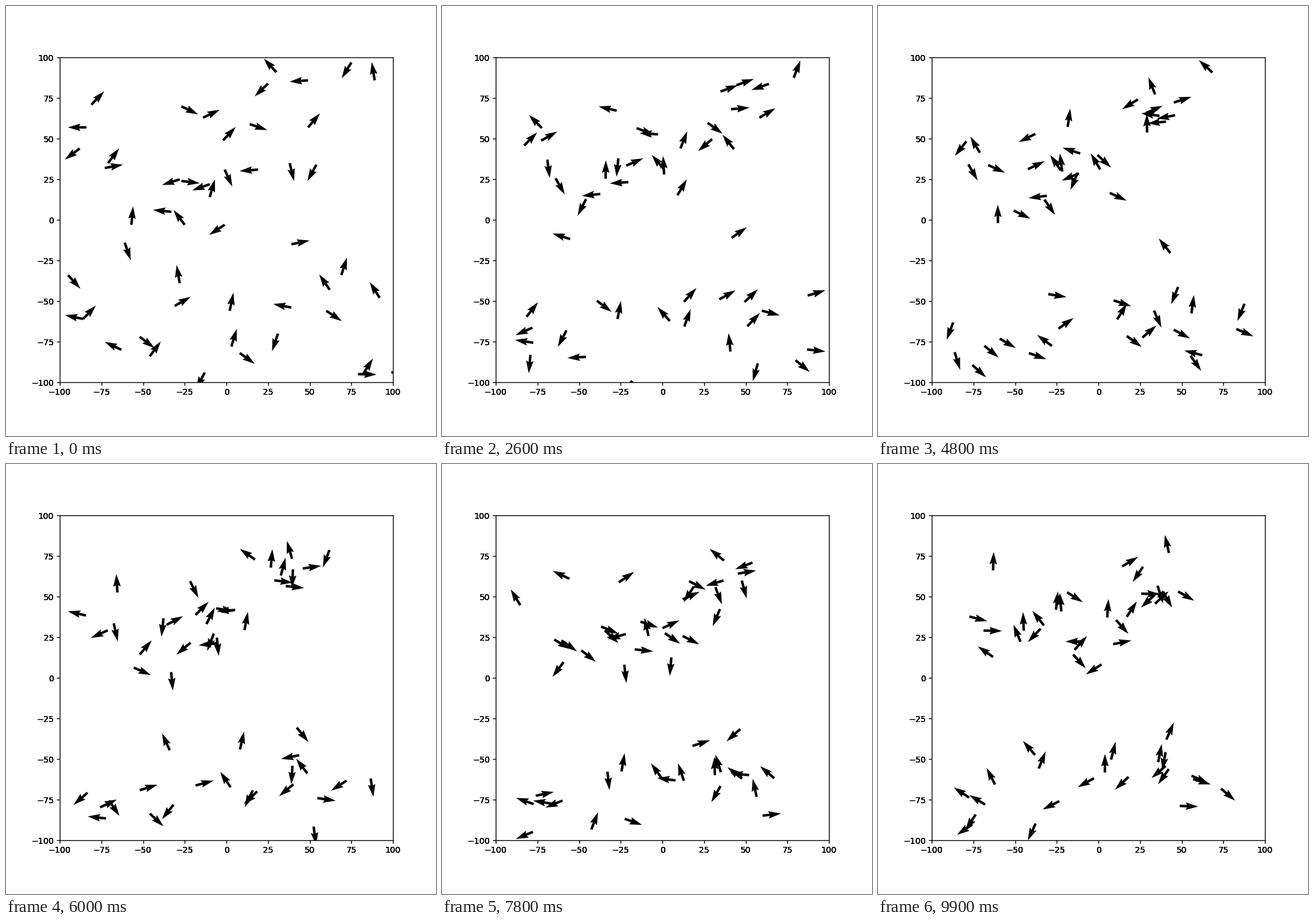
A matplotlib script for the animation above (10 s loop, 720 by 720 pixels).

```python
import numpy as np
import matplotlib.pyplot as plt
from matplotlib.animation import FuncAnimation

FRAMES = 100
SPEED = 1.5      # units walked per step
TURN = 1.1       # spread of the heading change, in radians
PULL = 0.015     # share of the way to the hub covered per step

# Start positions of the flock
X = [-81, -84, -88, -73, -71, -27, -14, -2, 14, 25, 30, 49, 75, 89, 49, 38,
     54, 19, -1, -28, -27, -10, -10, -33, -25, -1, -57, -61, -95, -86, -86,
     -28, -31, -52, -63, -46, -13, 3, 8, 2, 39, 69, 62, 39, 60, 31, 92, 99,
     82, 79]
Y = [71, 57, 44, 32, 35, 70, 63, 49, 59, 84, 91, 86, 97, 86, 57, 35,
     34, 31, 31, 25, 24, 14, 22, 5, -3, -3, -3, -14, -34, -61, -61,
     -39, -53, -72, -80, -84, -94, -78, -82, -56, -15, -34, -43, -54, -56,
     -70, -48, -94, -95, -95]

# Places where the flock gathers
HUB_X = [-62, -28, 0, 36, 45, 12, -38, -64]
HUB_Y = [38, 28, 28, 62, -54, -62, -66, -78]


def simulate():
    """Return positions and headings for every step of the loop."""
    rng = np.random.default_rng(11)
    pos = np.column_stack((X, Y)).astype(float)
    hubs = np.column_stack((HUB_X, HUB_Y))
    head = rng.uniform(0, 2 * np.pi, len(pos))
    dist = np.linalg.norm(pos[:, None] - hubs, axis=2)
    hub = hubs[dist.argmin(axis=1)]
    track = []
    for _ in range(FRAMES):
        track.append((pos, head))
        head = head + rng.normal(0, TURN, len(head))
        step = np.column_stack((np.cos(head), np.sin(head)))
        pos = pos + SPEED * step + PULL * (hub - pos)
    return track


def add_axes(fig):
    ax = fig.add_axes((0.125, 0.125, 0.775, 0.755))
    ticks = range(-100, 101, 25)
    ax.set(xlim=(-100, 100), ylim=(-100, 100), xticks=ticks, yticks=ticks)
    ax.patch.set_visible(False)
    return ax


track = simulate()
fig = plt.figure(figsize=(7.2, 7.2), dpi=100)

# Stacked axes give the labels their heavy look
for _ in range(4):
    ax = add_axes(fig)

pos, head = track[0]
arrows = ax.quiver(*pos.T, np.cos(head), np.sin(head), scale=18, width=0.0075)


def update(i):
    pos, head = track[i]
    arrows.set_offsets(pos)
    arrows.set_UVC(np.cos(head), np.sin(head))
    return arrows,


anim = FuncAnimation(fig, update, frames=FRAMES, interval=100, repeat=True)
plt.show()
```
